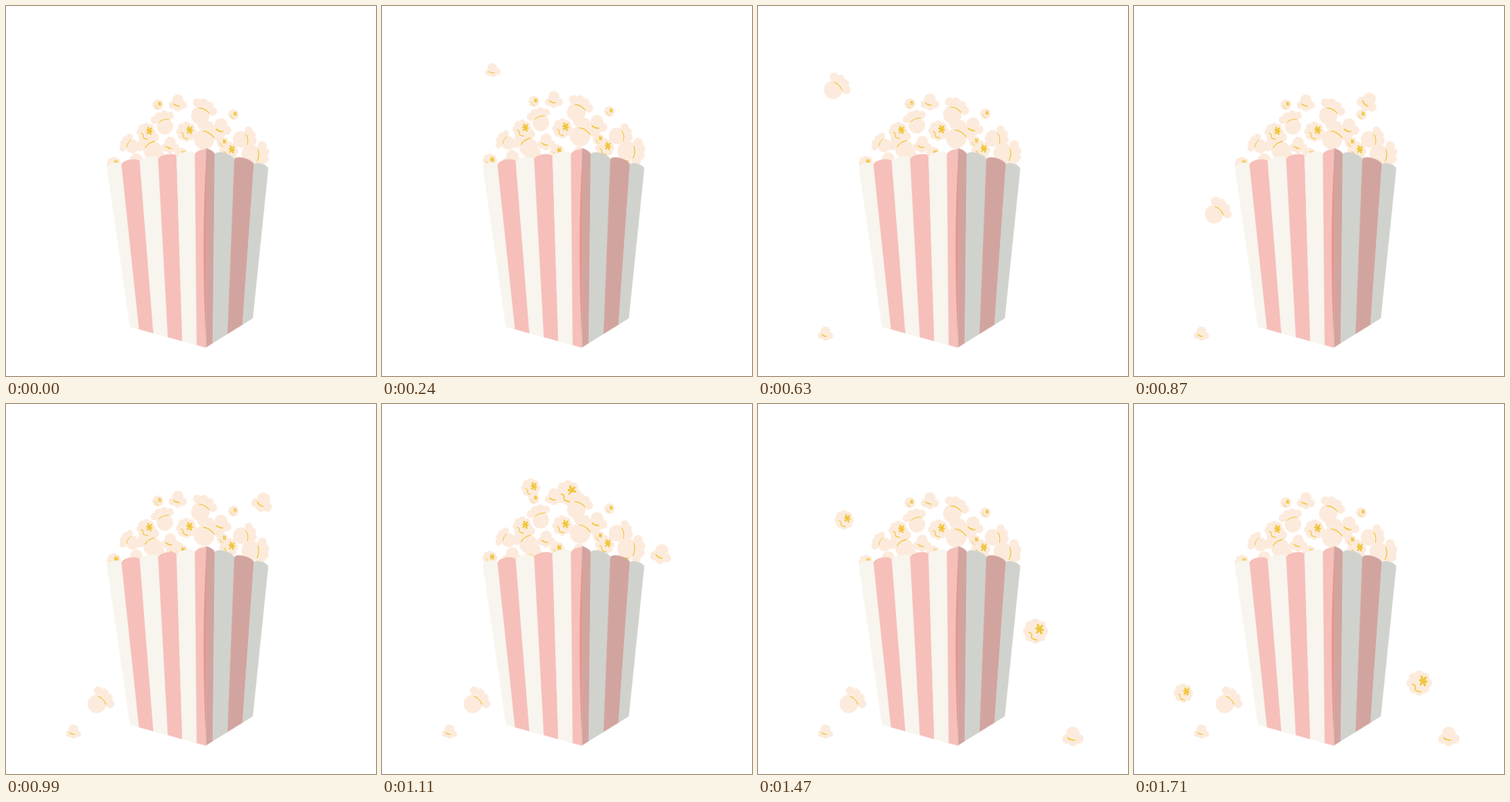
These frames come from a looping animation (480 px wide and 480 px high, 2.1 s). An HTML page with a canvas:

```html
<!DOCTYPE html>
<html>
<head>
<meta charset="utf-8">
<title>Popcorn</title>
<style>
html, body { margin: 0; width: 100%; height: 100%; overflow: hidden; background: #fff; }
canvas { display: block; }
</style>
</head>
<body>
<canvas id="stage" width="480" height="480"></canvas>
<script>
const ctx = document.getElementById('stage').getContext('2d');
const LOOP = 2100, STEP = 30, LAST = 1710;
const RIM = 190, FOLD = 259.5;
const RAD = Math.PI / 180;
const CREAM = '#fcebdc', YELLOW = '#f0c63a';
const PINK = '#f6bfb9', WHITE = '#f7f5ee', ROSE = '#d2a49f', GREY = '#d0d2cd';

// A kernel is a round core with lobes spread evenly between two angles
function kernel(core, count, from, to, reach, lobe, mark) {
  const body = new Path2D();
  const disc = (x, y, r) => {
    body.moveTo(x + r, y);
    body.arc(x, y, r, 0, 7);
  };
  disc(0, 0, core);
  for (let i = 0; i < count; i++) {
    const angle = (from + (to - from) * i / (count - 1)) * RAD;
    disc(reach * Math.cos(angle), reach * Math.sin(angle), lobe);
  }
  return { body, line: new Path2D(mark) };
}

const KINDS = {
  small: kernel(6.2, 3, 45, 135, 7.8, 4.4, 'M-5 4Q-2 7 2 6.500'),
  big: kernel(12, 4, -85, 0, 17, 5.7, 'M1-10Q8-8 12 1'),
  star: kernel(9, 8, 0, 315, 7.8, 4.8, 'M-7 1Q-3 2-4 5T2 9')
};
const SPARK = new Path2D('M2-7L6 3M7-6L1 2M0-3L8-1');

// Core position and size of the kernels in the heap, back to front
const HEAP = {
  star: [[289, 188, 1], [281, 177, .6], [182, 164, 1], [234, 163, 1.05], [197, 128, .58], [295, 141, .56]],
  big: [[164, 182, .75], [190, 187, 1], [318, 192, 1.05], [305, 173, .9], [257, 173, 1.1], [206, 156, .9], [252, 142, 1]],
  small: [[213, 177, 1.2], [279, 154, 1.35], [223, 122, 1.2]]
};

// start and end are times; every throw leaves the bucket at the rim
const THROWS = [
  { kind: 'small', size: 1, start: 150, end: 575, x0: 158, x1: 87.5, apex: 54, y1: 422, spin: -10 },
  { kind: 'big', size: 1, start: 290, end: 969, x0: 155, x1: 118, apex: 95, y1: 389, bend: -39 },
  { kind: 'small', size: 1.4, start: 740, end: 1299, x0: 274, x1: 408.5, apex: 114, y1: 427, spin: 35 },
  { kind: 'star', size: 1, start: 990, end: 1682, x0: 220, x1: 64, apex: 74, y1: 375 },
  { kind: 'star', size: 1.3, start: 1055, end: 1500, x0: 223, x1: 370, apex: 46, y1: 362 }
];

// Start, end and height of each shake of the heap
const SHAKES = [[30, 480, 4.3], [510, 860, 1.5], [890, 1350, 5.3]];

function drawKernel(kind, x, y, size, degrees = 0) {
  const { body, line } = KINDS[kind];
  ctx.save();
  ctx.translate(x, y);
  ctx.rotate(degrees * RAD);
  ctx.scale(size, size);
  ctx.fillStyle = CREAM;
  ctx.fill(body);
  ctx.strokeStyle = YELLOW;
  ctx.lineWidth = 1.1;
  ctx.stroke(line);
  if (kind === 'star') {
    ctx.lineWidth = 2.2;
    ctx.stroke(SPARK);
  }
  ctx.restore();
}

function drawThrow({ kind, size, start, end, x0, x1, apex, y1, bend = 0, spin = 0 }, t) {
  if (t < start) return;
  const p = Math.min(1, (t - start) / (end - start));
  const rise = Math.sqrt(RIM - apex), fall = Math.sqrt(y1 - apex);
  const x = x0 + (x1 - x0) * p + 4 * bend * p * (1 - p);
  const y = apex + ((rise + fall) * p - rise) ** 2;
  drawKernel(kind, x, y, size, spin * (1 - p));
}

function drawHeap(t) {
  let lift = 0;
  for (const [from, to, height] of SHAKES) {
    if (t > from && t < to) lift = height * Math.sin(Math.PI * (t - from) / (to - from)) ** 2;
  }
  for (let i = 0; i < 7; i++) {
    const y = 205 - 12 * Math.sin(Math.PI * i / 6);
    drawKernel(i % 3 ? 'small' : 'star', 140 + 29 * i, y - lift, i % 3 ? 1.3 : .75);
  }
  for (const kind of ['big', 'star', 'small']) {
    for (const [x, y, size] of HEAP[kind]) {
      drawKernel(kind, x, y - lift, size, kind === 'big' ? x - 270 : 0);
    }
  }
}

// Stripes of one side; edges, top and base give x or y as functions
function drawSide(colors, left, right, topEdge, baseEdge, topY, baseY) {
  ctx.save();
  ctx.beginPath();
  ctx.rect(left, 0, right - left, 480);
  ctx.clip();
  colors.forEach((color, i) => {
    const a = topEdge(i), b = topEdge(i + 1), c = baseEdge(i + 1), d = baseEdge(i);
    const hump = .3 * (b - a);
    ctx.beginPath();
    ctx.moveTo(a, topY(a));
    ctx.bezierCurveTo(a, topY(a) - hump, b, topY(b) - hump, b, topY(b));
    ctx.lineTo(c, baseY(c));
    ctx.lineTo(d, baseY(d));
    ctx.closePath();
    ctx.fillStyle = ctx.strokeStyle = color;
    ctx.lineWidth = .5;
    ctx.fill();
    ctx.stroke();
  });
  ctx.restore();
}

function drawBox() {
  drawSide([WHITE, PINK, WHITE, PINK, WHITE, PINK], 130, FOLD,
    i => Math.max(131, 126.2 + 23.8 * i), i => Math.max(161, 154 + 18.7 * i),
    x => 209 - .14 * (x - 131), x => 416 + .276 * (x - 161));
  drawSide([ROSE, GREY, ROSE, GREY], FOLD, 341,
    i => Math.min(340, 245.7 + 25.3 * i), i => Math.min(320, 249 + 19.3 * i),
    x => 196.5 + .26 * (x - 283.5), x => 443 - .623 * (x - 259));
  ctx.fillStyle = '#e3958e';
  ctx.fill(new Path2D('M260 192Q253 310 259.500 436Z'));
}

function draw(t) {
  ctx.fillStyle = '#fff';
  ctx.fillRect(0, 0, 480, 480);
  for (const item of THROWS) drawThrow(item, t);
  drawHeap(t);
  drawBox();
}

let origin;
function tick(now) {
  origin ??= now;
  const t = (now - origin) % LOOP;
  draw(Math.min(LAST, Math.floor(t / STEP) * STEP));
  requestAnimationFrame(tick);
}
draw(0);
requestAnimationFrame(tick);
</script>
</body>
</html>
```
